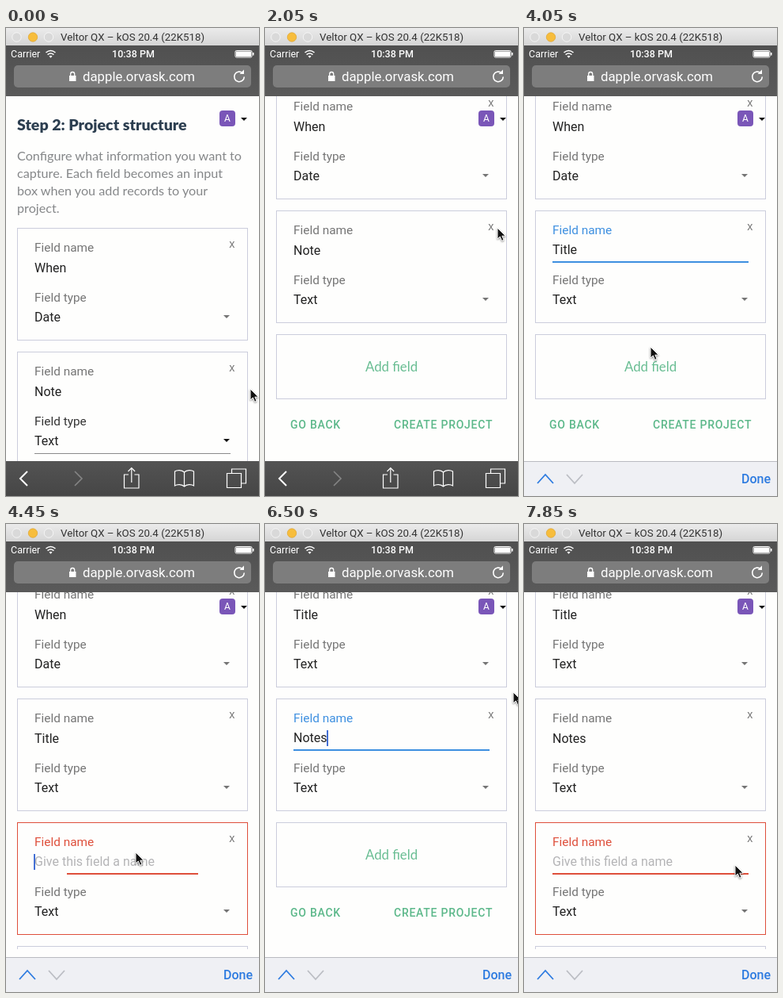
Animation of 320 by 590 pixels, one loop 8000 ms. Source, as an HTML page:

```html
<!DOCTYPE html>
<html lang="en">
<head>
<meta charset="utf-8">
<title>Project form</title>
<style>
html, body { margin: 0; width: 100%; height: 100%; overflow: hidden; background: #fefefd; }
body { font: 16px/20px Roboto, "Liberation Sans", sans-serif; color: #222; }
#stage { position: relative; width: 320px; height: 590px; overflow: hidden; background: #fefefd; }
#stage * { box-sizing: border-box; }
#stage div, #stage span, #stage svg { position: absolute; white-space: nowrap; }
#view { left: 0; top: 86px; width: 320px; height: 460px; overflow: hidden; }
#page { left: 0; top: -86px; width: 320px; height: 1100px; }
.lato { font-family: Lato, "Open Sans", sans-serif; }
#head { left: 14px; top: 112px; font-size: 19.6px; font-weight: 900; color: #2c3e50; }
#intro { left: 14px; top: 150px; font-size: 16.2px; line-height: 22px; color: #858789; }
.card, .add { left: 14px; width: 292px; border: 1px solid #cbcddc; }
.card { height: 142px; }
.label { left: 21px; top: 14px; font-size: 15.4px; }
.tint { left: 0; top: 0; color: #757575; }
.line { left: 21px; top: 63px; width: 248px; height: 2px; background: currentColor; }
.value { left: 21px; top: 40px; }
.value.on { top: 39px; }
.hint { color: #b4b4b6; }
.caret { left: 100%; top: 0; width: 2px; height: 20px; margin-left: -1px; background: #4470d4; }
.hint .caret { left: 0; }
.kind { top: 77px; color: #757575; }
.choice { left: 21px; top: 102px; }
.rule { left: 21px; top: 127px; width: 248px; height: 1px; background: #8b8b8b; }
.arrow { left: 260px; top: 109px; border: solid transparent; border-width: 4px 4px 0; border-top-color: currentColor; color: #757575; }
.x { left: 267px; top: 9px; font: 14px/20px Inter, sans-serif; color: #777; }
.add { top: 564px; height: 82px; color: #68bd92; }
.add .lato { left: 0; width: 290px; top: 30px; text-align: center; font-size: 16.8px; }
.tap { inset: -4px; border-radius: 4px; background: rgba(0,0,0,.2); }
.btn { top: 103px; font-size: 14px; font-weight: 500; letter-spacing: .75px; color: #5cb88a; }
#badge { left: 270px; top: 104px; width: 20px; height: 20px; border-radius: 4px; background: #7a56b8; color: #fff; font-size: 12px; text-align: center; }
#badgeArrow { left: 27px; top: 9px; border: solid transparent; border-width: 4px 4px 0; border-top-color: #111; }
#bar { left: 0; top: 0; width: 320px; height: 22px; background: linear-gradient(#ebebeb, #d5d5d5); color: #333; font-size: 13.3px; line-height: 23px; text-align: center; }
#nav { left: 0; top: 22px; width: 320px; height: 64px; background: linear-gradient(#505050, #5a5a5a); color: #fff; }
#url { left: 10px; top: 25px; width: 300px; height: 28px; border-radius: 5px; background: #7d7d7d; }
#tools, #keys { left: 0; top: 546px; width: 320px; height: 44px; }
#tools { background: linear-gradient(#535353, #464646); }
#keys { background: #eff0f4; border-top: 1px solid #b9bac0; }
#keys span { left: 275px; top: 12px; font-weight: 500; color: #2d7be0; }
#pick { left: 36px; top: 269px; width: 35px; height: 21px; background: rgba(70,130,200,.28); border: solid #2f6fd6; border-width: 0 2px; }
#pick::before, #pick::after { content: ""; position: absolute; width: 11px; height: 11px; border-radius: 50%; background: #2f6fd6; }
#pick::before { left: -6px; top: -11px; }
#pick::after { right: -6px; bottom: -11px; }
#menu { left: 10px; top: 215px; width: 253px; height: 36px; border-radius: 8px; background: #151515; color: #999; font-size: 15px; line-height: 36px; }
#menu span { text-align: center; height: 36px; }
#menu span + span { border-left: 1px solid #888; }
#menu::after { content: ""; position: absolute; left: 36px; top: 36px; border: solid transparent; border-width: 7px 7px 0; border-top-color: #151515; }
svg { left: 0; top: 0; fill: none; stroke: #fff; }
#mouse { overflow: visible; filter: drop-shadow(0 1px 1px rgba(0,0,0,.45)); }
</style>
</head>
<body>
<div id="stage">
  <div id="view"><div id="page">
    <div id="head" class="lato">Step 2: Project structure</div>
    <div id="intro" class="lato">Configure what information you want to<br>capture. Each field becomes an input<br>box when you add records to your<br>project.</div>
    <div class="add">
      <div class="lato">Add field</div>
      <div class="tap"></div><div class="tap"></div>
      <span class="btn" style="left:17px">GO BACK</span>
      <span class="btn" style="left:148px">CREATE PROJECT</span>
    </div>
  </div></div>

  <div id="badge">A<div id="badgeArrow"></div></div>

  <div id="tools"><svg width="320" height="44" stroke-width="1.2">
    <path d="M27 13l-9 9 9 9" stroke-width="2"/>
    <path d="M87 13l9 9-9 9" stroke="#858585" stroke-width="1.6"/>
    <path d="M155 17h-5.5v17h18.5v-17h-5.5M158.800 27V8.500M154.500 13l4.300-4.500 4.300 4.500"/>
    <path d="M225.500 14c-3-3-9-3-12-1v18c3-2 9-2 12 1c3-3 9-3 12-1v-18c-3-2-9-2-12 1v18"/>
    <path d="M279.500 15.500h18v18h-18zM285.500 15.500v-5.500h18v18h-6"/>
  </svg></div>
  <div id="keys"><svg width="320" height="44" stroke-width="1.8">
    <path d="M17 27l10-11 10 11" stroke="#2d7be0"/>
    <path d="M54 16l10 11 10-11" stroke="#bbbdc3"/>
  </svg><span>Done</span></div>

  <div id="pick"></div>
  <div id="menu">
    <span style="left:0;width:57px">Cut</span><span style="left:57px;width:67px">Copy</span><span style="left:124px;width:97px">Replace...</span><span style="left:221px;width:32px"><svg width="32" height="36"><path d="M11 13l10 5-10 5z" fill="#999" stroke="none"/></svg></span>
  </div>

  <div id="nav">
    <span style="left:6px;top:1px;font-size:12.5px">Carrier</span>
    <span style="left:0;width:322px;top:1px;font-size:12.5px;font-weight:500;text-align:center">10:38 PM</span>
    <div id="url"></div>
    <span style="left:97px;top:29px;font-size:16.8px">dapple.orvask.com</span>
    <svg width="320" height="64" stroke-width="1.6">
      <path d="M50.500 9q6-5 12 0M52.600 11.600q3.900-3.200 7.800 0"/>
      <path d="M54.500 13.500q2-1.500 4 0l-2 2.300z" fill="#fff" stroke="none"/>
      <rect x="290" y="6.500" width="21" height="8.500" rx="1.500" stroke-width="1"/>
      <path d="M291 7.500h19v6.500h-19zM312 9h1.500v3.500h-1.500z" fill="#fff" stroke="none"/>
      <path d="M80 38h8.500v7h-8.500z" fill="#fff" stroke="none"/>
      <path d="M81.700 38v-2a2.500 2.500 0 0 1 5 0v2" stroke-width="1.300"/>
      <path d="M299 34.600a6.300 6.300 0 1 0 2.300 5"/>
      <path d="M295.500 36h5.500v-5.500z" fill="#fff" stroke="none"/>
    </svg>
  </div>
  <div id="bar">Veltor QX – kOS 20.4 (22K518)<svg width="70" height="22" stroke="#c4c4c4" stroke-width=".7">
    <circle cx="13.500" cy="11.500" r="5.700" fill="#d9d9d9"/>
    <circle cx="34" cy="11.500" r="5.700" fill="#f7bd3c" stroke="#dda22c"/>
    <circle cx="54" cy="11.500" r="5.700" fill="#d9d9d9"/>
  </svg></div>
  <svg id="mouse" width="12" height="18"><path d="M0 0v14l3.300-3 2.300 5.300 2.500-1-2.300-5.100h4.400z" fill="#111" stroke-width="1"/></svg>
</div>

<script>
const LOOP = 8000, STEP = 50, LEAD = 4;
const GRAY = '#757575', BLUE = '#3d8fe0', RED = '#de4f3b', EDGE = '#cbcddc';
const $ = (q, root = document) => root.querySelector(q);

function track(el, prop, rows, glide) {
  const at = t => t < LOOP ? Math.max(0, t - LEAD) / LOOP : 1;
  const frames = rows.map(([t, v], i) => {
    const next = rows[i + 1] ? rows[i + 1][0] : LOOP;
    const n = glide ? Math.max(1, Math.round((next - t) / STEP)) : 1;
    return { offset: at(t), [prop]: v, easing: `steps(${n}, end)` };
  });
  if (rows[rows.length - 1][0] < LOOP)
    frames.push({ offset: 1, [prop]: rows[rows.length - 1][1] });
  el.animate(frames, { duration: LOOP, iterations: Infinity });
}
const hold = (el, prop, rows) => track(el, prop, rows, false);
const glide = (el, prop, rows) => track(el, prop, rows, true);
const show = (el, from, to = LOOP) => {
  const rows = [[from, 1], [to, to < LOOP ? 0 : 1]];
  hold(el, 'opacity', from > 0 ? [[0, 0], ...rows] : rows);
};
const slide = (el, rows) =>
  glide(el, 'transform', rows.map(([t, x, y]) => [t, `translate(${x}px, ${y}px)`]));

function make(parent, cls, html = '') {
  const el = document.createElement('div');
  el.className = cls;
  el.innerHTML = html;
  parent.append(el);
  return el;
}

function card(top, kind) {
  const el = make($('#page'), 'card', `
    <div class="tint"><span class="label">Field name</span><div class="line"></div></div>
    <span class="x">x</span><span class="label kind">Field type</span>
    <span class="choice">${kind}</span><div class="arrow"></div>`);
  el.style.top = top + 'px';
  $('.line', el).style.transform = 'scaleX(0)';
  return el;
}

const idle = (el, text, from, to) => show(make(el, 'value', text), from, to);

function active(el, text, from, to, caretEnd = to, cls = '') {
  const v = make(el, 'value on ' + cls, text);
  show(v, from, to);
  const caret = make(v, 'caret');
  show(caret, 0, caretEnd);
  return caret;
}

// Types the last letters of a word, one per time, and keeps the word until end.
function type(el, word, times, end, caretEnd) {
  const first = word.length - times.length + 1;
  times.forEach((t, i) => {
    const last = i === times.length - 1;
    active(el, word.slice(0, first + i), t, last ? end : times[i + 1], last ? caretEnd : undefined);
  });
}

function focus(el, from, to, colors) {
  const blur = to < LOOP;
  hold($('.tint', el), 'color', [[0, GRAY], ...colors, ...(blur ? [[to, GRAY]] : [])]);
  glide($('.line', el), 'transform', [
    [0, 'scaleX(0)'], [from, 'scaleX(0)'], [from + 150, 'scaleX(1)'],
    ...(blur ? [[to, 'scaleX(1)'], [to, 'scaleX(0)']] : [])]);
}

const ADD1 = 4350, ADD2 = 7100, FIT = 4400;
const HINT = 'Give this field a name';
const when = card(252, 'Date'), title = card(408, 'Text'),
      notes = card(564, 'Text'), blank = card(720, 'Text');

idle(when, 'When', 0, LOOP);

// second card: chosen type, then renamed
show(make(title, 'rule'), 0, 1500);
hold($('.kind', title), 'color', [[0, '#333'], [1500, GRAY]]);
hold($('.arrow', title), 'color', [[0, '#111'], [1250, GRAY]]);
idle(title, 'Note', 0, 2500);
active(title, 'Note', 2500, 3200, 2950);
type(title, 'Title', [3200, 3300, 3350, 3450, 3550], ADD1, 3800);
idle(title, 'Title', ADD1, LOOP);
focus(title, 2500, ADD1, [[2500, BLUE]]);

// third card
show(notes, ADD1);
const blink = active(notes, HINT, ADD1, 5250, 5250, 'hint');
hold(blink, 'opacity', [[0, 1], [4800, 0], [5000, 1]]);
type(notes, 'Note', [5250, 5300, 5400, 5450], 5650);
type(notes, 'Notes', [5650], ADD2);
idle(notes, 'Notes', ADD2, LOOP);
focus(notes, ADD1, ADD2, [[ADD1, RED], [5250, BLUE]]);
glide(notes, 'borderColor', [[0, RED], [5200, RED], [5400, EDGE]]);

// fourth card
show(blank, ADD2);
active(blank, HINT, ADD2, LOOP, 7600, 'hint');
focus(blank, ADD2, LOOP, [[ADD2, RED]]);
blank.style.borderColor = RED;

const add = $('.add'), taps = document.querySelectorAll('.tap');
hold(add, 'top', [[0, '564px'], [ADD1, '720px'], [ADD2, '876px']]);
show(taps[0], 4250, ADD1);
show(taps[1], 7000, ADD2);

slide($('#page'), [
  [0, 0, 0], [1450, 0, 0], [1750, 0, -160], [1800, 0, -175], [1850, 0, -178],
  [FIT - STEP, 0, -178], [FIT, 0, -188], [6300, 0, -188], [6350, 0, -212],
  [6400, 0, -282], [6450, 0, -338], [6500, 0, -344]]);
hold($('#view'), 'height', [[0, '460px'], [FIT, '450px']]);
hold($('#badge'), 'top', [[0, '104px'], [FIT, '94px']]);

slide($('#keys'), [
  [0, 0, 44], [2600, 0, 44], [2650, 0, 30], [2700, 0, 18],
  [2750, 0, 10], [2800, 0, 5], [2850, 0, 2], [2900, 0, 0]]);
show($('#pick'), 2950, 3200);
glide($('#menu'), 'opacity', [[0, 0], [2900, 0], [3000, 1], [3050, 1], [3200, 0]]);

slide($('#mouse'), [
  [0, 309, 455], [1450, 309, 455], [1850, 299, 237], [2000, 299, 237],
  [2050, 294, 252], [2450, 128, 278], [3750, 128, 278], [4050, 160, 402],
  [4200, 164, 414], [4750, 164, 414], [5050, 166, 408], [5600, 166, 408],
  [6150, 311, 484], [6300, 311, 484], [6350, 312, 460], [6450, 313, 300],
  [6500, 314, 212], [6550, 314, 192], [6700, 314, 192], [7000, 206, 405],
  [7400, 206, 405], [7450, 210, 409], [7550, 210, 409], [7800, 262, 436], [7850, 267, 430]]);
</script>
</body>
</html>
```
